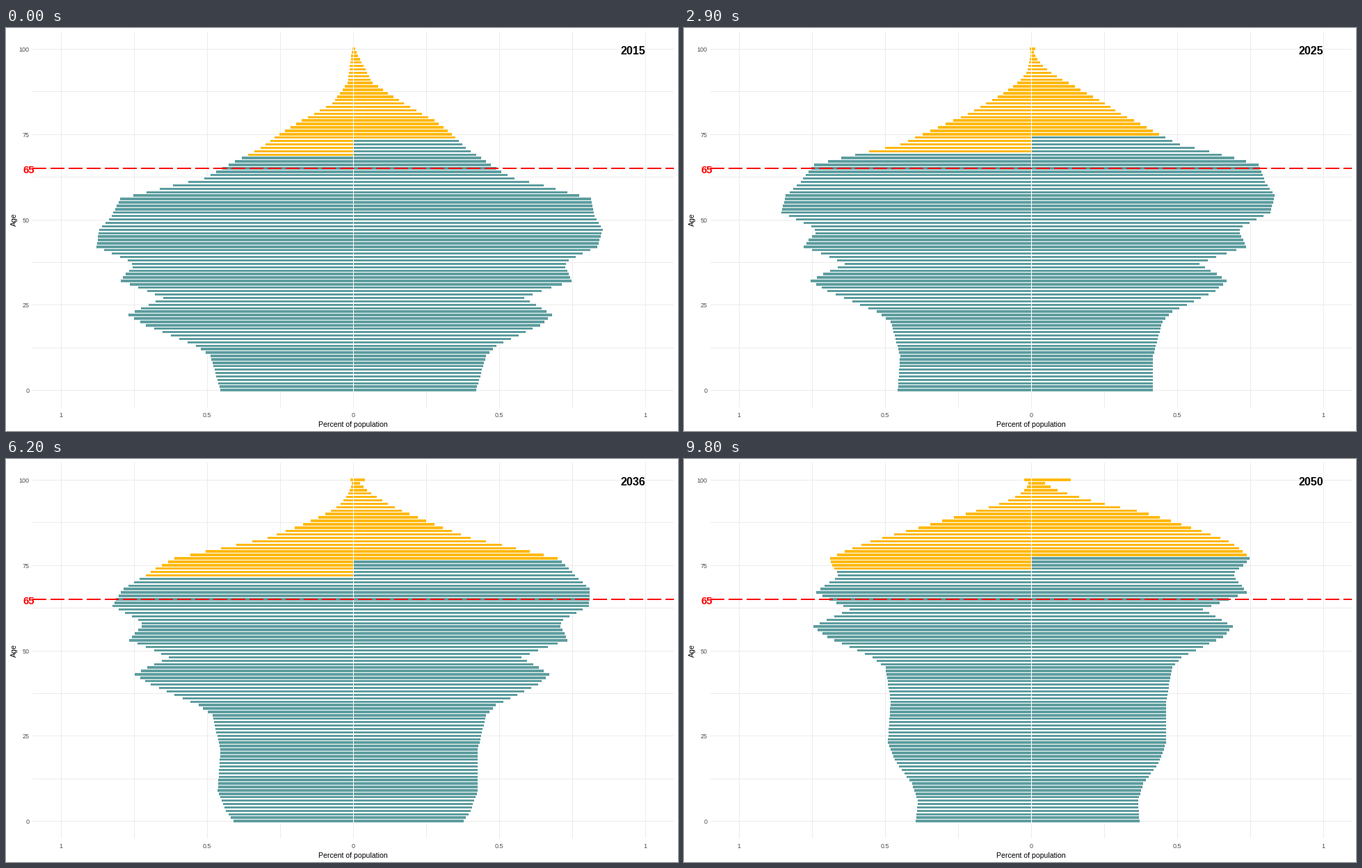
A matplotlib script for the animation above (10 s loop, 966 px wide and 580 px high).

```python
import matplotlib.pyplot as plt
import numpy as np
from matplotlib.animation import FuncAnimation
from matplotlib.collections import PolyCollection

W, H, DPI = 966, 580, 100
TEAL, GOLD, GRID = "#5F9EA0", "#FFB90F", "#EBEBEB"
MID, STEP, ROW = 499, 104.9, 4.91
LEFT, RIGHT, TOP, BOTTOM = 38, 960, 5, 546
AGES = np.arange(101)

# Turning points: age in 2015 (negative: born later), men, women (px)
COHORTS = np.array([
    (-35, 156, 142), (-29, 153, 140), (-24, 161, 147), (-18, 182, 167),
    (-12, 194, 177), (0, 190, 177), (10, 204, 191), (13, 225, 206),
    (19, 297, 269), (22, 322, 286), (24, 304, 271), (27, 272, 246),
    (29, 295, 271), (32, 333, 314), (34, 326, 310), (36.5, 314, 304),
    (38, 323, 310), (42, 368, 351), (47, 364, 359), (51, 346, 347),
    (56, 334, 342), (60, 258, 274), (62, 213, 232), (64, 196, 213),
    (71, 132, 162), (75, 105, 142), (79, 73, 117), (84, 29, 73),
    (90, 7, 28), (100, 0.5, 2)])


def row(age):
    return 521.08 - ROW * age


def widths(t, sizes, modal_age, growth, oldest):
    """Bar widths t years after 2015: cohorts age under Gompertz mortality."""
    born = AGES - t

    def hazard(age):
        return np.exp((age - modal_age) / 7.65)

    deaths = (hazard(AGES) - hazard(born)) * (1 + 0.7 * np.exp(-t / 15))
    share = -0.0025 * t + growth * t ** 2
    young = 0.07 * (t / 35) ** 2 * np.clip(1 - born / 22, 0, 1)
    w = np.interp(born, COHORTS[:, 0], sizes) * np.exp(share + young - deaths)
    w[100] = oldest * np.exp(0.088 * t)  # open-ended group
    return np.rint(w)


def box(x0, x1, y0, y1):
    return [(x0, y0), (x1, y0), (x1, y1), (x0, y1)]


def year_at(ms):
    if ms < 200:
        return 2015
    if ms < 8600:
        return 2016 + (ms - 200) // 300
    return 2044 + (ms - 8600) // 200


fig = plt.figure(figsize=(W / 100, H / 100), dpi=DPI, facecolor="white")
ax = fig.add_axes([0, 0, 1, 1])
ax.set(xlim=(0, W), ylim=(H, 0))
ax.axis("off")


def boxes(verts, color, z):
    c = PolyCollection(verts, facecolors=color, edgecolors="none",
                       linewidths=0, antialiased=False, zorder=z)
    ax.add_collection(c, autolim=False)
    return c


def label(x, y, s, px, color="black", **kw):
    return ax.text(x, y, s, fontsize=px * 72 / DPI, color=color,
                   family="Liberation Sans", zorder=6, **kw)


# Grid and axis labels
cols = [round(MID + STEP * k) for k in range(-4, 5)]
rows = [round(row(12.5 * k)) for k in range(9)]
boxes([box(x, x + 1, TOP, BOTTOM) for x in cols]
      + [box(LEFT, RIGHT, y, y + 1) for y in rows], GRID, 1)
for x, s in zip(cols[::2], ["1", "0.5", "0", "0.5", "1"]):
    label(x, 560, s, 9, "#4D4D4D", ha="center")
for age, y in zip(range(0, 101, 25), rows[::2]):
    label(33.5, y + 4, str(age), 9, "#4D4D4D", ha="right")
label(MID - 0.5, 573.5, "Percent of population", 10.5, ha="center")
label(11.5, 276, "Age", 10.5, ha="center", va="center", rotation=90)

bars = boxes([], TEAL, 2)

# Retirement line
ON, OFF = 20, 6
boxes([box(x, min(x + ON, RIGHT), 201, 203)
       for x in range(LEFT, RIGHT, ON + OFF)], "red", 4)
label(24.5, 209, "65", 15, "red", weight="bold")
year_text = label(919, 38, "", 16, ha="right", weight="bold")


def draw(i):
    year = year_at(i * 100)
    t = year - 2015
    men = widths(t, COHORTS[:, 1], 88.6, 0.00006, 0.42)
    women = widths(t, COHORTS[:, 2], 92.8, 0.00009, 2.6)
    halos, fills, colors = [], [], []
    for age in AGES:
        y0, y1 = round(row(age) - 0.35 * ROW), round(row(age) + 0.35 * ROW)
        sides = [(MID - 1 - men[age], MID, 68.5 + 0.14 * t),
                 (MID + 1, MID + women[age], 73.7 + 0.12 * t)]
        for x0, x1, limit in sides:
            halos.append(box(x0 - 1, x1 + 1, y0 - 1, y1 + 1))
            fills.append(box(x0, x1, y0, y1))
            colors.append(GOLD if age >= limit else TEAL)
    bars.set_verts(halos + fills)
    bars.set_facecolor(["white"] * len(halos) + colors)
    year_text.set_text(str(year))
    return bars, year_text


anim = FuncAnimation(fig, draw, frames=100, interval=100, repeat=True,
                     repeat_delay=0, blit=False)
plt.show()
```
